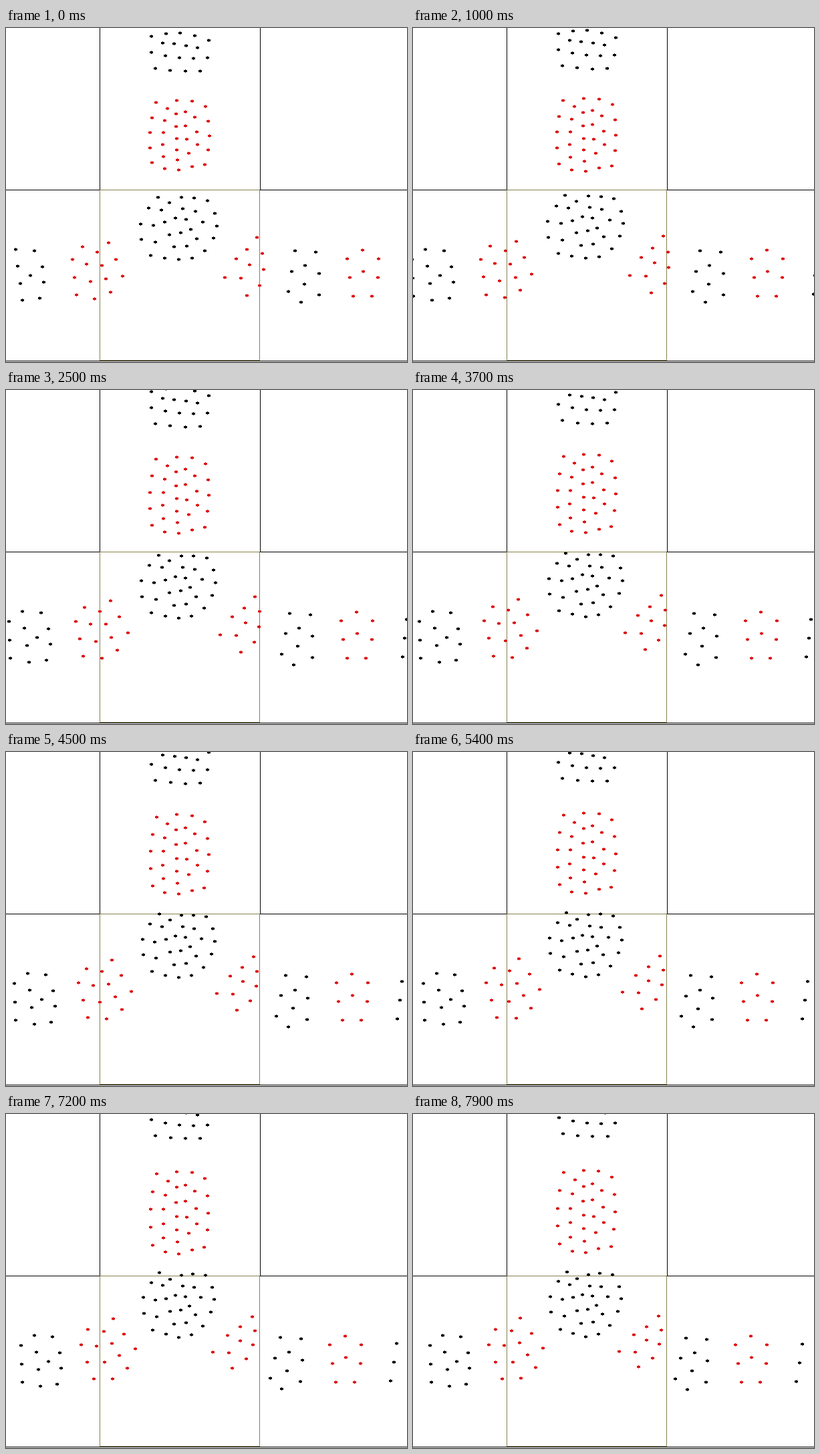
Animation of 600 by 500 pixels, one loop 8 s. Source, as a matplotlib script:

```python
import numpy as np
import matplotlib.pyplot as plt
from matplotlib.animation import FuncAnimation
from matplotlib.collections import PolyCollection
from matplotlib.patches import Rectangle

W, H, FRAMES, STEP = 600, 500, 80, 100
BLACK, RED, OLIVE = "#000000", "#dc1010", "#86804e"

# Dot outline on the pixel grid: 5 by 5, flat sides, one pixel tips.
DOT = np.array([(0, -2), (1, -2), (1, -1), (3, -1), (3, 2), (1, 2),
                (1, 3), (0, 3), (0, 2), (-2, 2), (-2, -1), (0, -1)])


def chain(x0, y0, x1, y1, n, bow=0, sag=0):
    """n dots evenly spread from end to end, bent sideways and downwards."""
    s = np.linspace(0, 1, n)
    bend = 4 * s * (1 - s)
    return np.column_stack([x0 + (x1 - x0) * s + bow * bend,
                            y0 + (y1 - y0) * s + sag * bend])


class Swarm:
    """Chains of one colour that share a rule for how far each dot travels."""

    def __init__(self, color, travel, *chains, ease=0.0, dip=0.0):
        self.color, self.ease = color, ease
        self.start = np.vstack(chains)
        x, y = self.start.T
        self.shift = np.column_stack(np.broadcast_arrays(*travel(x, y), x)[:2])
        self.dip = dip * (y - y.min()) / np.ptp(y)

    def at(self, u):
        pos = self.start + self.shift * (u + self.ease * u * (1 - u))
        pos[:, 1] += self.dip * np.sqrt(u) * (1 - u)
        return pos


swarms = [
    # above the box
    Swarm(BLACK, lambda x, y: (0.5, -31),
          chain(217, 12, 303, 18, 5, 0, -8),
          chain(234, 22, 286, 29, 4, 0, -1),
          chain(217, 36, 301, 44, 5, 0, 4),
          chain(223, 60, 290, 64, 4, 0, 2)),
    Swarm(RED, lambda x, y: (-0.03 * (x - 260), -6 - 0.19 * (205 - y)),
          chain(224, 111, 218, 201, 5, -6),
          chain(241, 120, 237, 210, 6, -5),
          chain(255, 108, 258, 212, 7, -2, 5),
          chain(268, 125, 278, 207, 5, -3),
          chain(278, 109, 286, 174, 4, 2, 3),
          chain(298, 117, 297, 204, 5, 6),
          ease=0.1, dip=9.6),
    # inside the box
    Swarm(BLACK,
          lambda x, y: (-0.08 * (x - 260), -13 - 0.12 * abs(x - 260)),
          chain(213, 269, 216, 340, 4, -15),
          chain(220, 295, 237, 344, 3, -6),
          chain(227, 253, 258, 346, 6, -2),
          chain(244, 261, 278, 344, 5, 0, 3),
          chain(262, 253, 285, 315, 5, -5, 2),
          chain(281, 254, 294, 290, 3, -5, 2),
          chain(301, 258, 297, 333, 5, 16),
          ease=0.3),
    # across the left edge of the box
    Swarm(RED,
          lambda x, y: (9 + 0.26 * (y - 327), -0.27 * (x - 95)),
          chain(99, 346, 105, 399, 3),
          chain(114, 327, 132, 405, 4),
          chain(136, 335, 156, 395, 4),
          chain(153, 321, 174, 371, 3),
          ease=0.25),
    # across the right edge of the box
    Swarm(RED,
          lambda x, y: (-10 - 0.18 * (y - 325), -12 - 0.12 * (y - 320)),
          chain(360, 331, 327, 373, 3, 0, -7),
          chain(364, 354, 360, 400, 3, -11, -3),
          chain(375, 313, 379, 385, 4, 8),
          ease=0.35),
    # far left
    Swarm(BLACK, lambda x, y: (31 - 0.05 * x, 0),
          chain(-6.5, 346, -4.5, 401, 3),
          chain(14, 331, 24, 407, 4),
          chain(36, 370, 36, 370, 1),
          chain(42, 333, 50, 404, 4, 10),
          ease=0.08),
    # far right
    Swarm(BLACK, lambda x, y: (-27 - 0.1 * (y - 365), 1.5),
          chain(432, 333, 422, 394, 3),
          chain(447, 355, 441, 410, 3, 2),
          chain(463, 335, 468, 399, 3, 2),
          chain(607, 342, 603, 398, 3),
          ease=0.08),
    Swarm(RED, lambda x, y: (-28, 0),
          chain(510, 345, 519, 401, 3, -1),
          chain(533, 332, 534, 364, 2),
          chain(557, 345, 547, 401, 3, 4),
          ease=0.05),
]

fig = plt.figure(figsize=(W / 100, H / 100), dpi=100, facecolor="white")
ax = fig.add_axes([0, 0, 1, 1])
ax.set(xlim=(0, W), ylim=(H, 0))
ax.axis("off")


def bar(x, y, w, h, color):
    ax.add_patch(Rectangle((x, y), w, h, fc=color, lw=0, antialiased=False))


for x in (140, 380):
    bar(x, 0, 1, 242, BLACK)
for y in (242, 498):
    bar(0, y, W, 1, BLACK)
for y in (242, 497):
    bar(140, y, 240, 1, OLIVE)
for x in (140, 379):
    bar(x, 242, 1, 256, OLIVE)


def outlines(pos):
    return np.floor(pos + 0.5)[:, None, :] + DOT


layers = []
for swarm in swarms:
    dots = PolyCollection(outlines(swarm.at(0)), facecolors=swarm.color,
                          linewidths=0, antialiaseds=False, zorder=3)
    ax.add_collection(dots, autolim=False)
    layers.append(dots)


def update(i):
    u = i / (FRAMES - 1)
    for dots, swarm in zip(layers, swarms):
        dots.set_verts(outlines(swarm.at(u)))
    return layers


anim = FuncAnimation(fig, update, frames=FRAMES, interval=STEP,
                     repeat=True, repeat_delay=0)
plt.show()
```
